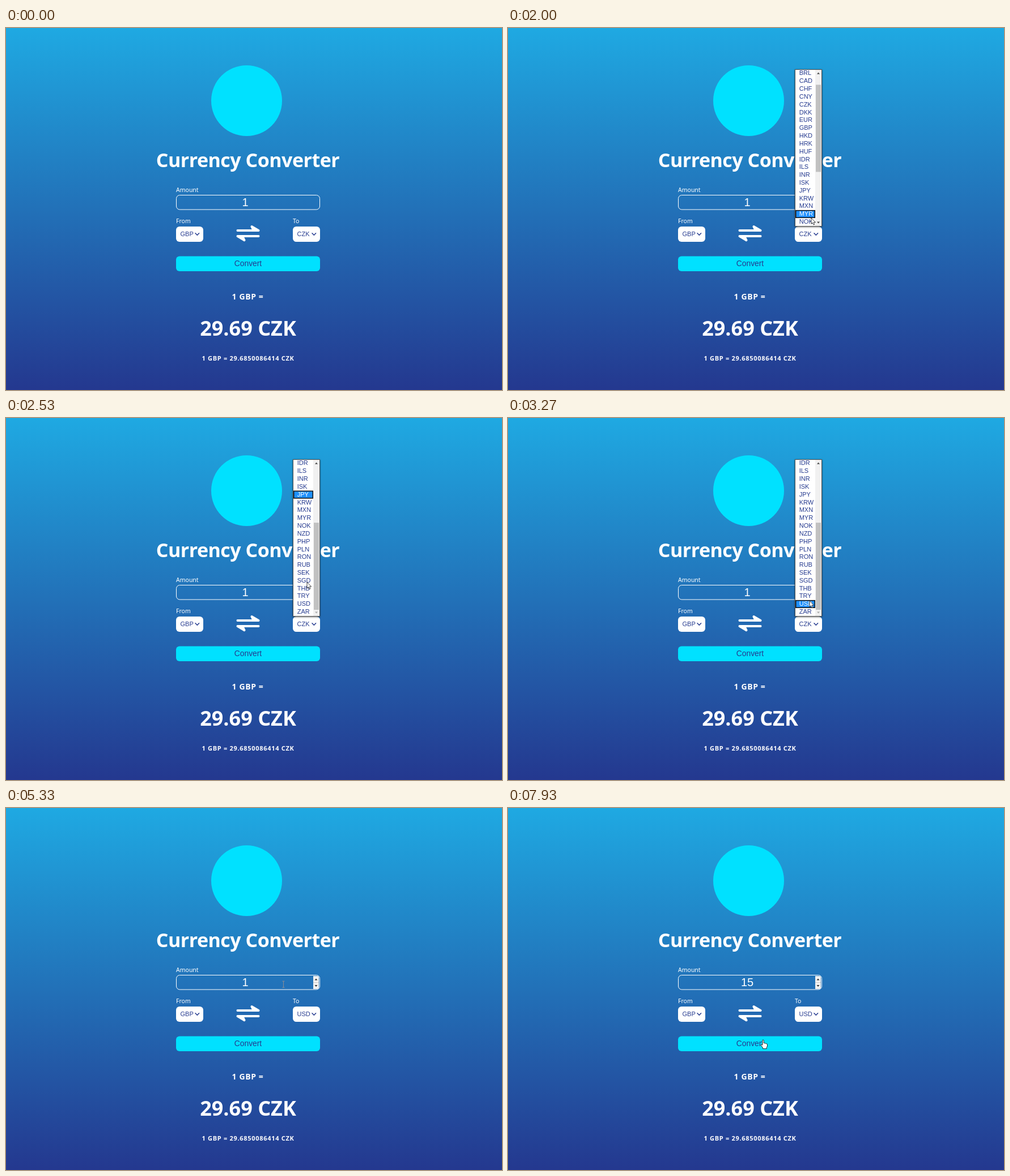
Animation, 875 px wide and 640 px high, one loop 8000 ms. Source, as an HTML page:

```html
<!DOCTYPE html>
<html lang="en">
<head>
<meta charset="utf-8">
<title>Currency Converter</title>
<style>
html, body { margin: 0; width: 100%; height: 100%; overflow: hidden; background: #24388f; }
svg { display: block; }
text { font: 11px "Liberation Sans", Arial, sans-serif; fill: #253a8f; }
.label { font: 10.5px "Noto Sans", sans-serif; fill: #fff; }
.bold { font: bold 36px "Noto Sans", sans-serif; fill: #fff; text-anchor: middle; }
.title { font-size: 34px; letter-spacing: -.5px; }
.base { font-size: 14px; letter-spacing: .6px; }
.rate { font-size: 11px; letter-spacing: .7px; }
.amount { font-size: 20px; fill: #fff; text-anchor: middle; }
.button { font-size: 13.8px; text-anchor: middle; }
.chevron { fill: none; stroke: #253a8f; stroke-width: 1.5; stroke-linecap: round; }
.on { fill: #fff; }
</style>
</head>
<body>
<svg width="875" height="640" viewBox="0 0 875 640">
  <defs>
    <linearGradient id="sky" x2="0" y2="1">
      <stop stop-color="#1fa9e2"/>
      <stop offset=".5" stop-color="#2271b8"/>
      <stop offset="1" stop-color="#24388f"/>
    </linearGradient>
    <filter id="shadow" x="-20%" width="140%">
      <feDropShadow dx="0" dy="1" stdDeviation="1.6" flood-opacity=".55"/>
    </filter>
    <clipPath id="view"><path d="M507 74H542V350H507Z"/></clipPath>
  </defs>
  <rect width="875" height="640" fill="url(#sky)"/>
  <circle cx="424.5" cy="128.5" r="62.5" fill="#00e1ff"/>
  <text class="bold title" x="426.5" y="246">Currency Converter</text>

  <text class="label" x="300" y="289.5">Amount</text>
  <rect x="300.5" y="295.5" width="253" height="25.5" rx="6" fill="none" stroke="#fff"/>
  <text class="amount" id="amount" x="422" y="315"></text>
  <path id="caret" d="M427.5 297V319" stroke="#fff"/>
  <g id="spinner">
    <path d="M542 297H549Q552 297 552 300V317Q552 320 549 320H542Z" fill="#f1f1f1"/>
    <path d="M542 308.5H552" stroke="#ccc"/>
    <path d="M544.5 304.5H549.5L547 301.5ZM544.5 313H549.5L547 316Z" fill="#333"/>
  </g>

  <text class="label" x="300" y="345">From</text>
  <text class="label" x="506" y="345">To</text>
  <rect x="300" y="351" width="48" height="27" rx="6" fill="#fff"/>
  <rect x="506" y="351" width="48" height="27" rx="6" fill="#fff"/>
  <text x="307.5" y="368">GBP</text>
  <text id="target" x="513.5" y="368"></text>
  <path class="chevron" d="M334 362.7L337.3 366.2 340.6 362.7M540 362.7L543.3 366.2 546.6 362.7"/>
  <g fill="#fff" stroke="#fff" stroke-width="4" stroke-linecap="round" stroke-linejoin="round">
    <path d="M408.5 358H445.5M433.5 351L445.5 358H437ZM445.5 368H408.5M420.5 375.2L408.5 368H417Z"/>
  </g>

  <rect x="300" y="403.5" width="254" height="26.5" rx="6" fill="#00e1ff"/>
  <text class="button" x="427" y="421">Convert</text>
  <text class="bold base" x="426.5" y="479.5">1 GBP =</text>
  <text class="bold" x="427" y="544">29.69 CZK</text>
  <text class="bold rate" x="427" y="588">1 GBP = 29.6850086414 CZK</text>

  <g id="popup">
    <rect x="506.5" y="73.5" width="47" height="277" fill="#fff" stroke="#555" filter="url(#shadow)"/>
    <g clip-path="url(#view)">
      <g id="list"><rect id="mark" x="507.7" width="33.6" height="12.6" fill="#1e90ff" stroke="#101010" stroke-width="1.5"/></g>
    </g>
    <rect x="542" y="74" width="11" height="276" fill="#f1f1f1"/>
    <rect id="thumb" x="543" width="9" height="154" fill="#c1c1c1"/>
    <path d="M545 81.5H550L547.5 78.5Z" fill="#444"/>
    <path id="down" d="M545 342.5H550L547.5 345.5Z"/>
  </g>

  <g id="cursor" stroke-linejoin="round">
    <path id="arrow" d="M0 .3V11L2.5 8.8 4.2 12.6 6 11.8 4.4 8.1H7.6Z" fill="#fff" stroke="#111" stroke-width=".8"/>
    <path id="hand" d="M-1.2 9.3V1.2A1.2 1.2 0 0 1 1.2 1.2V5.7L2.4 5.5 3.4 6.2 4.6 6 5.5 6.8 6.8 6.8 7.5 7.8V11L6.2 13.6V15.6H-.4V14.1L-3.7 9.4Q-3.8 7.6-2.4 8Z" fill="#fff" stroke="#111" stroke-width=".9"/>
    <path id="beam" d="M-2-5.5H2M0-5.5V5.5M-2 5.5H2" fill="none" stroke="#8b8d96"/>
  </g>
</svg>
<script>
const LOOP = 8000, FPS = 15, ROW = 13.82, TOP = 73.3;
const codes = ("AUD BGN BRL CAD CHF CNY CZK DKK EUR GBP HKD HRK HUF IDR ILS INR ISK " +
  "JPY KRW MXN MYR NOK NZD PHP PLN RON RUB SEK SGD THB TRY USD ZAR").split(" ");
// Pointer path: step, x, y
const path = [[17, 860, 626], [22, 537, 361], [29, 537, 361], [34, 531, 290], [42, 531, 290],
  [49, 532, 323], [73, 532, 323], [84, 483, 310], [96, 483, 310], [100, 486, 312],
  [102, 486, 312], [105, 511, 322], [112, 511, 322], [119, 450, 410]];

const $ = id => document.getElementById(id);
const set = (id, name, value) => $(id).setAttribute(name, value);
const show = (id, on) => set(id, "visibility", on ? "visible" : "hidden");
const easeOut = p => 1 - (1 - p) ** 2;

const items = codes.map((code, i) => {
  const item = document.createElementNS("http://www.w3.org/2000/svg", "text");
  item.textContent = code;
  item.setAttribute("x", 513.7);
  item.setAttribute("y", TOP + 10.2 + i * ROW);
  return $("list").appendChild(item);
});

function pointer(n) {
  const i = path.findIndex(k => k[0] >= n);
  if (i < 1) return path[0].slice(1);
  const [a, x0, y0] = path[i - 1], [b, x1, y1] = path[i];
  const p = easeOut((n - a) / (b - a));
  return [x0 + (x1 - x0) * p, y0 + (y1 - y0) * p];
}

const scrollAt = n => 2 + 11 * easeOut(Math.min(1, Math.max(0, (n - 34) / 4)));

function selected(n) {
  if (n < 30) return 6;
  if (n > 34 && n < 43) return 17;
  const y = pointer(n)[1];
  return y > 350 ? 6 : Math.floor((y - TOP) / ROW + scrollAt(n));
}

function drawPopup(n) {
  const open = n >= 27 && n < 63;
  $("popup").style.display = open ? "" : "none";
  if (!open) return;
  const scroll = scrollAt(n), current = selected(n);
  set("list", "transform", `translate(0 ${-scroll * ROW})`);
  set("mark", "y", TOP + current * ROW + .6);
  set("thumb", "y", 85 + scroll * 7.7);
  set("down", "fill", scroll < 13 ? "#444" : "#aaa");
  items.forEach((item, i) => item.classList.toggle("on", i === current));
}

function drawCursor(n) {
  const [x, y] = pointer(n);
  const inside = (l, t, r, b) => x >= l && x <= r && y >= t && y <= b;
  const closed = n < 30 || n >= 63;
  const hand = closed && (inside(506, 351, 554, 378) || inside(300, 403, 554, 430));
  const beam = closed && inside(300, 295, 554, 321);
  set("cursor", "transform", `translate(${x} ${y})`);
  show("hand", n >= 17 && hand);
  show("beam", n >= 17 && beam);
  show("arrow", n >= 17 && !hand && !beam);
  show("spinner", n >= 84 || beam);
}

function draw(t) {
  const n = Math.floor((t % LOOP + 4) * FPS / 1000) % (LOOP * FPS / 1000);
  const typed = n >= 105;
  $("amount").textContent = typed ? "15" : "1";
  $("target").textContent = n < 63 ? "CZK" : "USD";
  set("caret", "transform", `translate(${typed ? 6 : 0} 0)`);
  show("caret", n >= 84 && n < 92 || n >= 100 && n < 113);
  drawPopup(n);
  drawCursor(n);
}

const start = performance.now();
function tick() {
  draw(performance.now() - start);
  requestAnimationFrame(tick);
}
tick();
</script>
</body>
</html>
```
